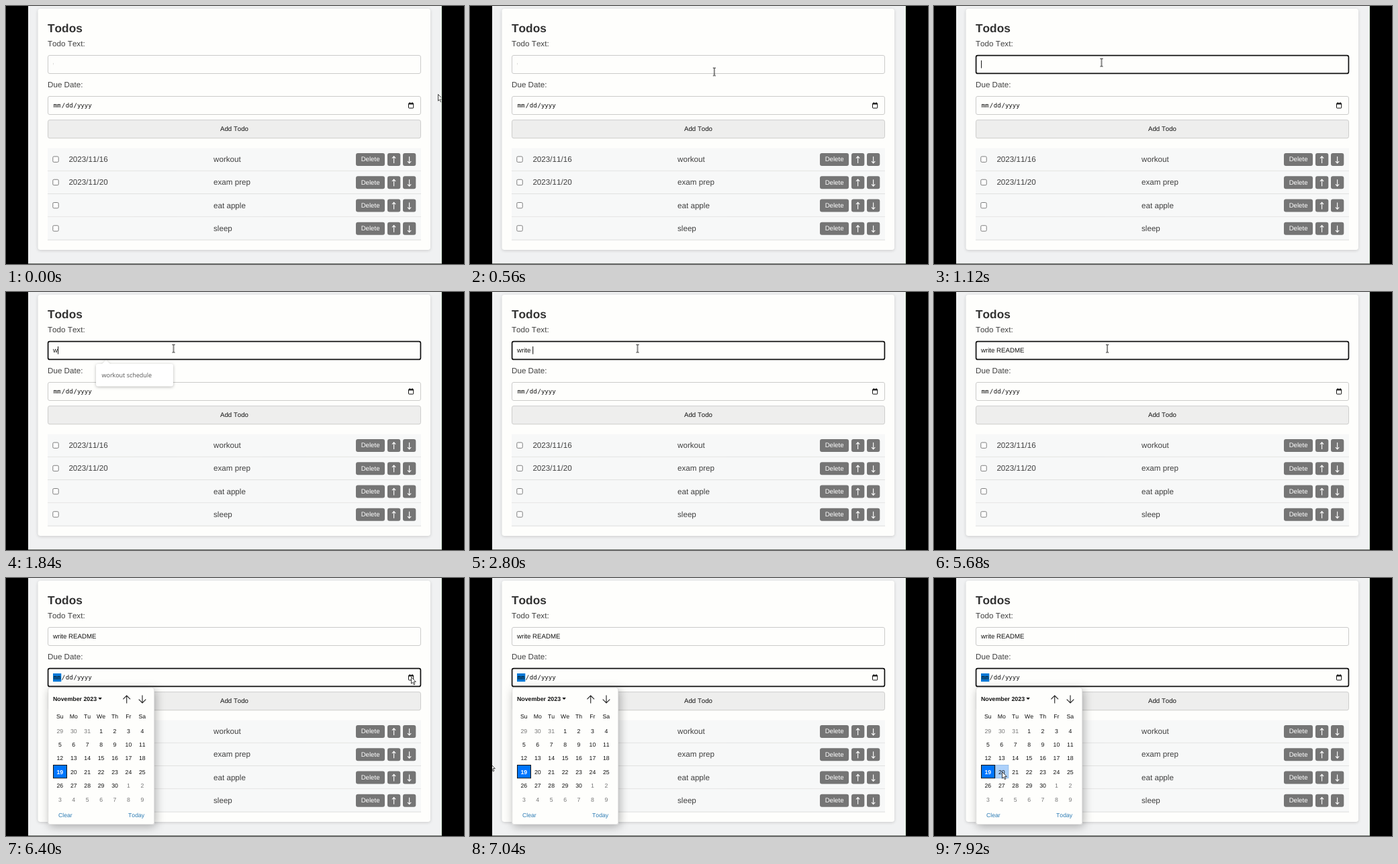
These frames come from a looping animation (682x384 px, 8000 ms). An HTML page:

```html
<!DOCTYPE html>
<html lang="en">
<head>
<meta charset="utf-8">
<title>Todos</title>
<style>
html, body { margin: 0; width: 100%; height: 100%; overflow: hidden; background: #000; }
svg { display: block; width: 682px; height: 384px; }
text {
  font: 11.65px "Liberation Sans", Arial, sans-serif;
  fill: #414141; font-kerning: none; text-rendering: geometricPrecision; white-space: pre;
}
.title { font-size: 17.3px; font-weight: bold; fill: #333; }
.small { font-size: 9.67px; fill: #111; }
.white { fill: #fff; }
.mid { text-anchor: middle; }
.mono { font: 9.1px "DejaVu Sans Mono", monospace; fill: #111; }
.hint { font: 9px "Open Sans", sans-serif; fill: #555; }
.cal text { font-size: 8.7px; fill: #111; }
.cal .bold { font-weight: bold; }
.cal .dim { fill: #767676; }
.cal .link { fill: #2b7bb4; }
.cal .white { fill: #fff; }
.field { fill: #fefefc; stroke: #cbcbca; }
.ring { fill: none; stroke: #101010; stroke-width: 1.7; }
.dark { fill: #757575; }
.arrow { fill: none; stroke: #fff; stroke-width: 1.1; }
.card { filter: drop-shadow(0 1px 2px rgba(0,0,0,.16)); }
.cal .panel { filter: drop-shadow(2px 3px 7px rgba(0,0,0,.3)); }
.hint-box { filter: drop-shadow(0 1px 2px rgba(0,0,0,.28)); }

.pointer, .shape, .type, .caret, .text-focus, .date-focus, .hint-group, .hover {
  animation: 8s step-end infinite;
}
.pointer { animation-name: move; animation-timing-function: ease-in-out; }
.beam { animation-name: beam; }
.tip { animation-name: tip; }
.type { animation-name: type; }
.caret { animation-name: caret; }
.text-focus { animation-name: text-focus; }
.date-focus { animation-name: date-focus; }
.hint-group { animation-name: hint; }
.hover { animation-name: hover; }

@keyframes move {
  0%, 2% { transform: translate(643px, 131px); }
  10%, 69% { transform: translate(249.5px, 84px); }
  71% { transform: translate(258px, 84px); }
  76% { transform: translate(618px, 158px); }
  78%, 81% { transform: translate(603px, 147px); }
  88%, 89% { transform: translate(30px, 276px); }
  96%, 100% { transform: translate(101px, 288px); }
}
@keyframes beam { 0% { opacity: 0; } 6.6% { opacity: 1; } 72.7%, 100% { opacity: 0; } }
@keyframes tip { 0% { opacity: 1; } 6.6% { opacity: 0; } 72.7%, 100% { opacity: 1; } }
@keyframes type {
  0% { transform: translateX(0); }
  23% { transform: translateX(7px); }
  26% { transform: translateX(10.2px); }
  28% { transform: translateX(12.4px); }
  30% { transform: translateX(15px); }
  32% { transform: translateX(20.4px); }
  34% { transform: translateX(23.1px); }
  37% { transform: translateX(30.1px); }
  39% { transform: translateX(36.5px); }
  43% { transform: translateX(43px); }
  51% { transform: translateX(50px); }
  53% { transform: translateX(58px); }
  59%, 100% { transform: translateX(64.5px); }
}
@keyframes caret {
  0% { opacity: 0; }
  12% { opacity: 1; }
  18.25% { opacity: 0; }
  23% { opacity: 1; }
  49.25% { opacity: 0; }
  51% { opacity: 1; }
  65.25% { opacity: 0; }
  71.5% { opacity: 1; }
  77.75%, 100% { opacity: 0; }
}
@keyframes text-focus { 0% { opacity: 0; } 12% { opacity: 1; } 80%, 100% { opacity: 0; } }
@keyframes date-focus { 0% { opacity: 0; } 80%, 100% { opacity: 1; } }
@keyframes hint { 0% { opacity: 0; } 23% { opacity: 1; } 26%, 100% { opacity: 0; } }
@keyframes hover { 0% { opacity: 0; } 95%, 100% { opacity: 1; } }
</style>
</head>
<body>
<svg viewBox="0 0 682 384">
  <rect x="33" width="616" height="384" fill="#f0f1f2"/>
  <rect class="card" x="47.5" y="4" width="584.5" height="359" rx="4" fill="#fefefc"/>

  <text class="title" x="62" y="38.6">Todos</text>
  <text x="62" y="60.2">Todo Text:</text>
  <text x="62" y="121.2">Due Date:</text>

  <rect class="field" x="62.5" y="73.5" width="555" height="27" rx="2.5"/>
  <text class="small" x="70" y="89.8">write README</text>
  <g class="type">
    <rect x="70.2" y="78" width="75" height="18" fill="#fefefc"/>
    <path class="caret" d="M70.6 81v11.5" stroke="#111"/>
  </g>
  <rect class="ring text-focus" x="62.6" y="73.6" width="554.8" height="26.8" rx="2.5"/>

  <rect class="field" x="62.5" y="134.5" width="555" height="27" rx="2.5"/>
  <text class="mono" y="151.2"><tspan x="70.5">mm</tspan><tspan x="82.8">/</tspan><tspan x="88.8">dd</tspan><tspan x="100.4">/</tspan><tspan x="105.9">yyyy</tspan></text>
  <g fill="none" stroke="#111">
    <rect x="599.5" y="145" width="7.2" height="7" rx=".8"/>
    <path d="M599.5 145.5h7.2" stroke-width="2"/>
    <path d="M601.3 143.2v2M605 143.2v2"/>
  </g>
  <g class="date-focus">
    <rect class="ring" x="62.6" y="134.6" width="554.8" height="26.8" rx="2.5"/>
    <rect x="70" y="142" width="12.3" height="12.3" fill="#0078d7"/>
    <text class="mono white" x="70.5" y="151.2">mm</text>
  </g>

  <rect x="62.5" y="169.7" width="555" height="27" rx="2.5" fill="#eeeeed" stroke="#cdcdcc"/>
  <text class="small mid" x="340" y="186.3">Add Todo</text>

  <g id="list"></g>

  <g class="hint-group">
    <path class="hint-box" fill="#fff" d="M137 107h6l6-5.5 6 5.5h91q3 0 3 3v27.500q0 3-3 3h-109q-3 0-3-3v-27.500q0-3 3-3z"/>
    <text class="hint" x="142.500" y="127">workout schedule</text>
  </g>

  <g class="cal date-focus">
    <rect class="panel" x="62.500" y="163" width="158.500" height="204" rx="3" fill="#fff"/>
    <rect x="62.700" y="163.200" width="158" height="203.500" rx="3" fill="#fefefc" stroke="#c8c8c8" stroke-width=".6"/>
    <text class="bold" x="70" y="182.700" style="font-size:8.8px">November 2023</text>
    <path d="M137.300 178h5.600l-2.800 3.200z" fill="#111"/>
    <g fill="none" stroke="#222" stroke-width="1.100">
      <path d="M179.700 186.500v-11.500m-5.300 5.300l5.300-5.300 5.300 5.300"/>
      <path d="M203 174.500v11.500m-5.300-5.300l5.300 5.300 5.300-5.300"/>
    </g>
    <rect x="70.500" y="278.500" width="20" height="19.300" fill="#0075ff" stroke="#111"/>
    <rect class="hover" x="91.300" y="278.300" width="19.600" height="19.600" fill="#add1fa" stroke="#7ba9da" stroke-width=".6"/>
    <g id="days"></g>
    <text class="link" x="78" y="355.600">Clear</text>
    <text class="link" x="182" y="355.600">Today</text>
  </g>

  <g class="pointer">
    <path class="shape beam" d="M-2 -5.500h1.500l.5.500.500-.500h1.500M0 -5v10.500M-2 6h1.500l.5-.5.500.5h1.500" fill="none" stroke="#111"/>
    <path class="shape tip" d="M.5.500v9.700l2.200-2 1.600 3.600 1.600-.700-1.600-3.500h3z" fill="#fff" stroke="#111" stroke-width=".8"/>
  </g>

  <path d="M648.500 0v384" stroke="#d3e4d3"/>
  <path d="M33 383.500h616" stroke="#6f746f"/>
  <path d="M0 0h33v384h-33zM649 0h33v384h-33z"/>
</svg>
<script>
const todos = [["2023/11/16", "workout"], ["2023/11/20", "exam prep"], ["", "eat apple"], ["", "sleep"]];

const arrowButton = (x, y, dir) => `
  <rect class="dark" x="${x}" y="${y - 9.3}" width="19.3" height="19" rx="3"/>
  <path class="arrow" d="M${x + 9.6} ${y + .7 - 5 * dir}v${10 * dir}m-2.6 ${-2.8 * dir}l2.6 ${2.8 * dir} 2.6 ${-2.8 * dir}"/>`;

const row = ([date, name], i) => {
  const y = 228.2 + i * 34.25;
  return `
  <rect x="62" y="${y - 16.7}" width="556" height="34.25" fill="#f7f8f8"/>
  <path d="M62 ${y + 17.2}h556" stroke="#dededd"/>
  <rect x="69.8" y="${y - 4.2}" width="8.4" height="8.4" rx="1.6" fill="#fff" stroke="#6f6f6f" stroke-width=".9"/>
  <text x="93.4" y="${y + 4}">${date}</text>
  <text x="309" y="${y + 4}">${name}</text>
  <rect class="dark" x="521" y="${y - 9.3}" width="43" height="19" rx="3"/>
  <text class="small white mid" x="542.6" y="${y + 3.2}">Delete</text>
  ${arrowButton(568, y, -1)}${arrowButton(591, y, 1)}`;
};

const dayCell = (label, col, y, cls) =>
  `<text class="mid ${cls}" x="${80.3 + col * 20.42}" y="${y + 3.1}">${label}</text>`;

// The grid opens on Sunday, October 29.
const days = Array.from({ length: 42 }, (_, i) => {
  const n = i - 2;
  const inMonth = n > 0 && n <= 30;
  const label = n <= 0 ? n + 31 : n > 30 ? n - 30 : n;
  const cls = n === 19 ? "bold white" : inMonth ? "" : "dim";
  return dayCell(label, i % 7, 227.4 + Math.floor(i / 7) * 20.45, cls);
});
const names = ["Su", "Mo", "Tu", "We", "Th", "Fr", "Sa"].map((d, i) => dayCell(d, i, 206.3, ""));

document.getElementById("list").innerHTML = todos.map(row).join("");
document.getElementById("days").innerHTML = names.concat(days).join("");
</script>
</body>
</html>
```
